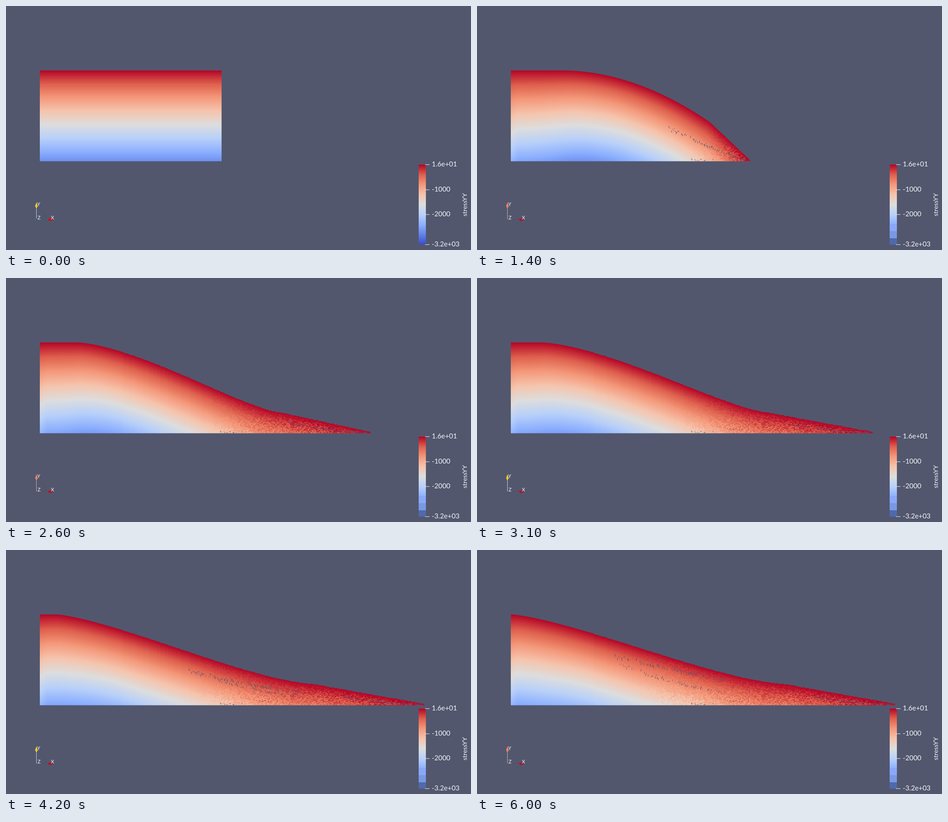
Animation, 1031 px wide and 543 px high, one loop 6100 ms. Source, as an HTML page with a canvas:

```html
<!DOCTYPE html>
<html lang="en">
<head>
<meta charset="utf-8">
<title>Slump stress</title>
<style>
html, body { margin: 0; width: 100%; height: 100%; overflow: hidden; background: #52576e; }
canvas { display: block; }
</style>
</head>
<body>
<canvas id="stage" width="1031" height="543"></canvas>
<script>
const ctx = document.getElementById('stage').getContext('2d');
const LOOP = 6100, STEP = 100;
const BG = [82, 87, 110], BG_CSS = '#52576e';
const LEFT = 75, TOP = 143.5, BOTTOM = 345.5;

const clamp = (v, a = 0, b = 1) => Math.min(b, Math.max(a, v));
const lerp = (a, b, u) => a + (b - a) * u;
const smooth = u => { u = clamp(u); return u * u * (3 - 2 * u); };
const hash = (a, b) => {
  const s = Math.sin(a * 127.1 + b * 311.7) * 43758.5453;
  return s - Math.floor(s);
};

// Cool-to-warm colour scale
const SCALE = [
  [59, 76, 192], [98, 130, 234], [141, 176, 254], [184, 208, 249], [221, 221, 221],
  [245, 196, 173], [244, 152, 122], [222, 96, 77], [180, 4, 38]
];
function heat(v) {
  const p = clamp(v) * 8, i = Math.min(7, Math.floor(p));
  return SCALE[i].map((c, k) => lerp(c, SCALE[i + 1][k], p - i));
}
const LUT = Array.from({ length: 512 }, (_, i) => heat(i / 511));

// The slumping outline at s seconds: flat crest, curved slope to a corner, straight toe
function shapeAt(s) {
  const crest = 205 - 130 * smooth(s / 6.5);
  const cornerX = 478 + 205 * smooth((s - 0.3) / 4);
  const drop = 155 * (1 - Math.exp(-Math.pow(s / 1.247, 2.58)));
  const tip = 478 + 449 * smooth((s - 0.05) / 3.85);
  const late = smooth((s - 1.4) / 1.2), settle = smooth((s - 3) / 1.2);
  const p = 1.95 - 0.45 * late - 0.15 * settle;
  const q = 1 + 0.33 * late + 0.15 * settle;
  const cornerY = TOP + drop, tipY = 342.5;

  function top(x) {
    if (x <= crest) return TOP;
    if (x <= cornerX) {
      const u = (x - crest) / (cornerX - crest);
      return TOP + drop * (1 - Math.pow(1 - Math.pow(u, p), q));
    }
    return lerp(cornerY, tipY, clamp((x - cornerX) / (tip - cornerX)));
  }
  const face = y => lerp(cornerX, tip, clamp((y - cornerY) / (tipY - cornerY)));
  return { top, face, tip, late };
}

const W = 860, H = 206, OX = 72, OY = 142;
const image = ctx.createImageData(W, H);

function drawBody(s, shape) {
  const { tip, late } = shape;
  const grow = clamp(s / 0.6);
  const relief = grow * (1 - smooth((s - 0.6) / 1));
  const loose = clamp(s - 0.3);
  const noisyFrom = 430 - 30 * late - 100 * smooth((s - 3.1) / 2.9);
  const data = image.data;

  for (let i = 0; i < W; i++) {
    const x = OX + i + 0.5;
    const inside = x > LEFT - 0.5 && x < tip + 0.5;
    let top = inside ? shape.top(Math.min(x, tip)) : 999;
    if (x > 240) top += (hash(Math.floor(x / 3), 7) - 0.5) * 1.4 * late;
    const wall = 0.06 * (1 - smooth((x - LEFT) / 18));
    const side = 0.93 + 0.08 * smooth((x - 90) / 170) - 0.1 * smooth((x - 420) / 250) - wall;
    const bulge = 0.1 * relief * Math.exp(-Math.pow((x - 310) / 45, 2));
    const base = lerp(1, side, grow) + bulge;
    const rough = loose * smooth((x - noisyFrom) / 170);

    for (let j = 0; j < H; j++) {
      const y = OY + j + 0.5, o = (j * W + i) * 4;
      const cover = inside ? clamp(y + 0.5 - top) * clamp(BOTTOM + 0.5 - y) : 0;
      let rgb = BG;
      if (cover) {
        const depth = Math.max(0, y - top);
        const free = Math.pow(clamp((shape.face(y) - x) / 190), 0.6);
        let v = 1 - depth * base * lerp(1, free, relief) / 241;
        if (rough) {
          const amp = rough * (0.035 + 0.08 * smooth((y - 295) / 45)) * clamp(depth / 10, 0.2);
          v += (hash(Math.floor(x / 3), Math.floor(y / 2)) - 0.5) * amp;
        }
        rgb = LUT[Math.round(clamp(v) * 511)];
      }
      for (let c = 0; c < 3; c++) data[o + c] = lerp(BG[c], rgb[c], cover);
      data[o + 3] = 255;
    }
  }
  ctx.putImageData(image, OX, OY);
}

// Small upright marks between two x values, at a share of the local depth
function flecks(shape, x0, x1, d0, d1, density, tall, color = BG_CSS) {
  ctx.fillStyle = color;
  for (let x = x0, i = 0; x < x1; x += 2, i++) {
    if (hash(i, 3) > density) continue;
    const share = lerp(d0, d1, (x - x0) / (x1 - x0)) + (hash(i, 11) - 0.5) * 0.07;
    const y = lerp(shape.top(x), BOTTOM, share), h = 1.5 + hash(i, 5) * tall;
    ctx.fillRect(Math.round(x), y - h / 2, 1, Math.min(h, BOTTOM - y + h / 2));
  }
}

function drawGaps(s, shape) {
  const open = clamp((s - 1) / 0.4), inner = clamp((s - 3.3) / 0.9);
  const creep = smooth((s - 4.2) / 1.8), start = 405 - 100 * creep;
  flecks(shape, shape.tip - 180, shape.tip - 8, 0.48, 0.75, 0.7 * open, 4);
  flecks(shape, start, start + 255, 0.35 - 0.1 * creep, 0.42 - 0.2 * creep, 0.6 * inner, 5);
  flecks(shape, start + 10, start + 245, 0.36, 0.62, 0.5 * inner, 3);
  flecks(shape, 475, 525, 0.98, 0.98, 0.6 * open, 2);
  flecks(shape, 553, 602, 0.86, 0.88, 0.5 * clamp((s - 2.7) / 0.4), 2, '#7c3c4c');
}

function label(text, x, y, size = 15.3) {
  ctx.font = size + 'px Lato, "Open Sans", sans-serif';
  ctx.fillText(text, x, y);
}

function drawLegend(s) {
  const x = 915, y = 353, h = 178;
  const fill = ctx.createLinearGradient(0, y, 0, y + h);
  SCALE.forEach((c, i) => fill.addColorStop(1 - i / 8, `rgb(${c})`));
  ctx.fillStyle = fill;
  ctx.fillRect(x, y, 16, h);
  if (s > 0) {
    ['#8aa8fa', '#7b98e4', '#4f69ad'].forEach((color, i) => {
      ctx.fillStyle = color;
      ctx.fillRect(x, 485 + i * 16, 16, 46 - i * 16);
    });
  }
  ctx.fillStyle = '#f4f4f6';
  [['1.6e+01', 353], ['-1000', 409], ['-2000', 464], ['-3.2e+03', 531]].forEach(([text, ty]) => {
    ctx.fillRect(929, ty - 0.5, 10, 1);
    label(text, 944, ty + 4);
  });
  ctx.save();
  ctx.translate(1022, 468);
  ctx.rotate(-Math.PI / 2);
  label('stressYY', 0, 0, 14);
  ctx.restore();
}

function arrowHead(x, y, angle, color) {
  ctx.save();
  ctx.translate(x, y);
  ctx.rotate(angle);
  ctx.fillStyle = color;
  ctx.beginPath();
  ctx.moveTo(0, 0);
  ctx.lineTo(-8, 3);
  ctx.lineTo(-12, 1.2);
  ctx.lineTo(-12, -1.2);
  ctx.lineTo(-8, -3);
  ctx.fill();
  ctx.restore();
}

function drawAxes(s) {
  const rest = s === 0;
  const warm = (s >= 1 && s < 2.9) || s >= 5.2;
  ctx.fillStyle = warm ? '#dca8a4' : '#d0d2d8';
  ctx.fillRect(67, 447, 1, 28);
  ctx.fillStyle = rest ? '#2c6878' : '#743f55';
  ctx.fillRect(rest ? 68 : 80, 475, 18, 1);
  if (rest) ctx.fillRect(65, 473, 5, 4);
  arrowHead(67.5, 437, -Math.PI / 2, warm ? '#f08068' : '#e8cf28');
  arrowHead(105.5, 475.5, 0, rest ? '#e00808' : '#bd1020');
  ctx.fillStyle = '#f4f4f6';
  label('Y', 69, 445, 11);
  label('Z', 70, 475, 11);
  label('X', 99.5, 475, 11);
}

function draw(s) {
  const shape = shapeAt(s);
  ctx.fillStyle = BG_CSS;
  ctx.fillRect(0, 0, 1031, 543);
  drawBody(s, shape);
  drawGaps(s, shape);
  drawLegend(s);
  drawAxes(s);
}

const start = performance.now();
let shown = -1;
function tick() {
  const t = Math.floor(((performance.now() - start) % LOOP) / STEP) * STEP;
  if (t !== shown) {
    shown = t;
    draw(t / 1000);
  }
  requestAnimationFrame(tick);
}
tick();
</script>
</body>
</html>
```
